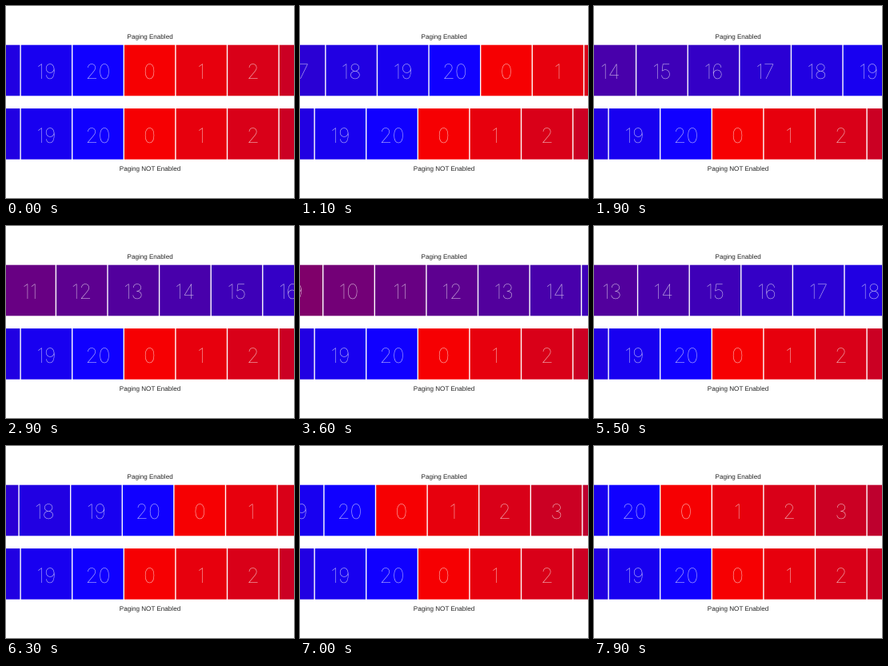
Write an HTML page that moves like this. It is 360 by 240 pixels and loops after 8 s.

```html
<!DOCTYPE html>
<html lang="en">
<head>
<meta charset="utf-8">
<title>Paging carousel</title>
<style>
  html, body { margin: 0; width: 100%; height: 100%; overflow: hidden; background: #fff; }
  svg { display: block; width: 100vw; height: 100vh; }
  text { text-anchor: middle; text-rendering: geometricPrecision; }
  .label { font: 8.1px "Liberation Sans", Arial, sans-serif; fill: #222; }
  .num { font: 100 25.5px Inter, Roboto, sans-serif; fill: #fff; fill-opacity: .75; }
</style>
</head>
<body>
<svg viewBox="0 0 360 240">
  <text class="label" x="180.1" y="41.2">Paging Enabled</text>
  <g id="paged"></g>
  <g id="free"></g>
  <text class="label" x="180" y="206.2">Paging NOT Enabled</text>
</svg>
<script>
const NS = 'http://www.w3.org/2000/svg';
const LOOP = 8000, STEP = 100;
const COUNT = 21, PITCH = 64.6, SIZE = 63.2, CENTER = 179.6;

function add(parent, tag, attrs) {
  const el = document.createElementNS(NS, tag);
  for (const k in attrs) el.setAttribute(k, attrs[k]);
  return parent.appendChild(el);
}

function makeRow(id, y) {
  const root = document.getElementById(id);
  return Array.from({ length: 8 }, () => {
    const cell = add(root, 'g', {});
    const rect = add(cell, 'rect', { x: -SIZE / 2, y, width: SIZE, height: 63.6 });
    const text = add(cell, 'text', { class: 'num', x: 0, y: y + 42.4 });
    return { cell, rect, text };
  });
}

// Red to blue, slightly darker in the middle
function color(i) {
  const u = i / (COUNT - 1);
  const dip = 4 * u * (1 - u);
  const red = 246 - 230 * u - 16 * dip;
  const blue = 2 + 253 * u - 10 * dip;
  return `rgb(${Math.round(red)},0,${Math.round(blue)})`;
}

// page is the (fractional) item index at the centre of the row
function drawRow(row, page) {
  const first = Math.floor(page) - 3;
  row.forEach(({ cell, rect, text }, k) => {
    const n = first + k;
    const item = ((n % COUNT) + COUNT) % COUNT;
    const x = CENTER + (n - page) * PITCH;
    cell.setAttribute('transform', `translate(${x.toFixed(2)} 0)`);
    rect.setAttribute('fill', color(item));
    text.textContent = item;
  });
}

// Share of a flick still to go: short pull, then a decaying glide
function remaining(t, start, release, end, power, left) {
  if (t <= start) return 1;
  if (t >= end) return 0;
  if (t < release) return 1 - (1 - left) * ((t - start) / (release - start)) ** 2;
  return left * ((end - t) / (end - release)) ** power;
}

function pageAt(t) {
  const back = remaining(t, 700, 1000, 4500, 1.77, 0.925);
  const ahead = remaining(t, 4840, 5130, 7333, 2.1, 0.878);
  return 11 + 10 * back + 11 * (1 - ahead);
}

const paged = makeRow('paged', 48.7);
const free = makeRow('free', 128.1);
drawRow(free, 0);

function frame(now) {
  const t = Math.floor((now % LOOP) / STEP) * STEP;
  drawRow(paged, pageAt(t));
  requestAnimationFrame(frame);
}
drawRow(paged, pageAt(0));
requestAnimationFrame(frame);
</script>
</body>
</html>
```
